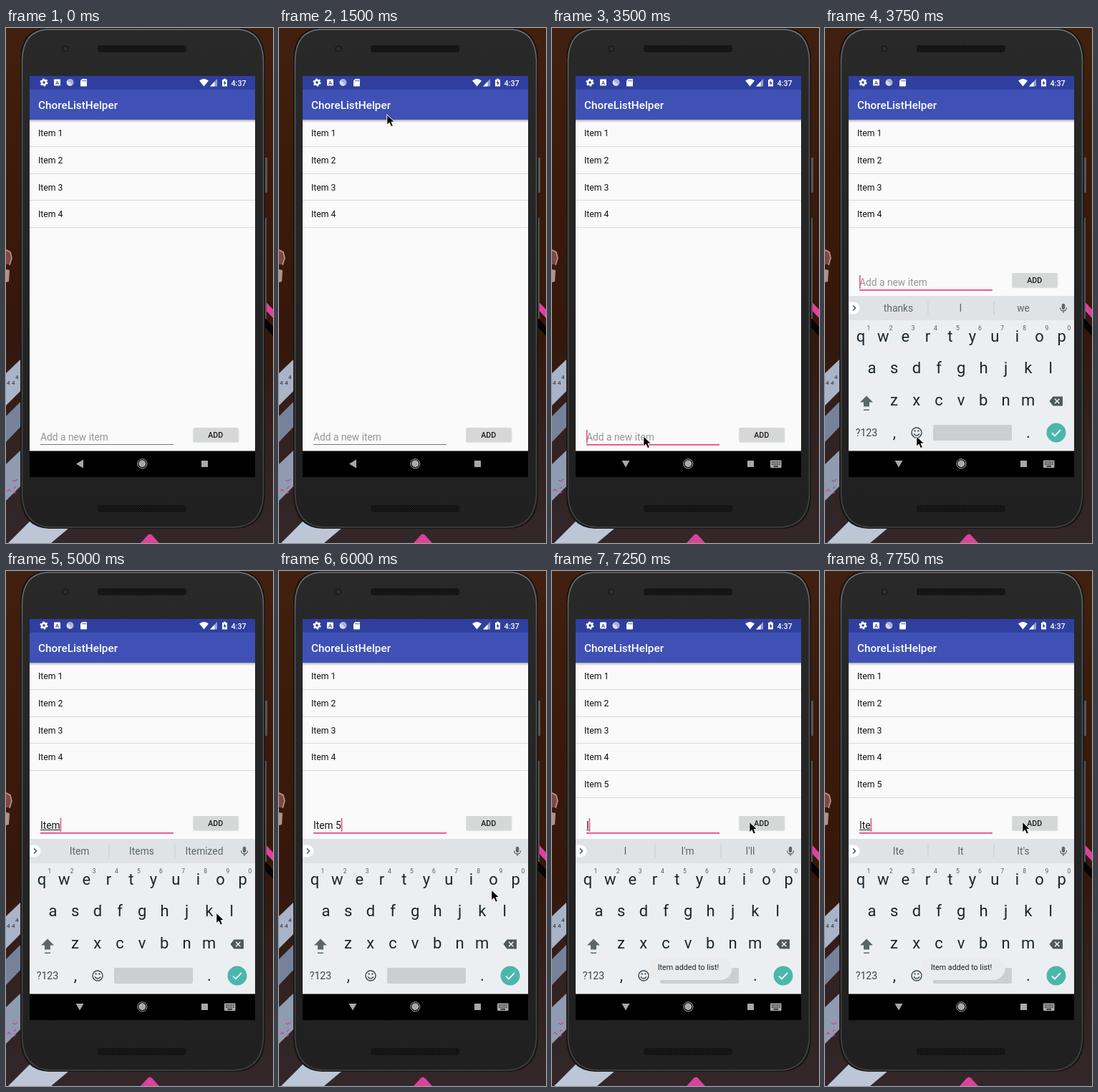
These frames come from a looping animation (373x719 px, 8 s). An HTML page:

```html
<!DOCTYPE html>
<html lang="en">
<head>
<meta charset="utf-8">
<title>List app</title>
<style>
  html, body { margin: 0; width: 100%; height: 100%; overflow: hidden; background: #381a0d; }
  svg { display: block; width: 100vw; height: 100vh; }
  text { font-family: Roboto, sans-serif; white-space: pre; }
  .mid { text-anchor: middle; }
  .bold { font-weight: 500; }
</style>
</head>
<body>
<svg id="stage" viewBox="0 0 373 719" xmlns="http://www.w3.org/2000/svg">
  <defs>
    <linearGradient id="wall" x2="0" y2="1">
      <stop offset="0" stop-color="#42200f"/>
      <stop offset=".3" stop-color="#3c1a0a"/>
      <stop offset=".6" stop-color="#35170b"/>
      <stop offset=".8" stop-color="#322220"/>
      <stop offset="1" stop-color="#33272a"/>
    </linearGradient>
    <linearGradient id="body" x2="0" y2="1">
      <stop offset="0" stop-color="#292929"/>
      <stop offset="1" stop-color="#202020"/>
    </linearGradient>
    <linearGradient id="rim" x2="0" y2="1">
      <stop offset="0" stop-color="#777"/>
      <stop offset=".12" stop-color="#585858"/>
      <stop offset="1" stop-color="#444"/>
    </linearGradient>
    <linearGradient id="drop" x2="0" y2="1">
      <stop offset="0" stop-color="#000" stop-opacity=".3"/>
      <stop offset="1" stop-color="#000" stop-opacity="0"/>
    </linearGradient>
    <pattern id="mesh" width="3" height="3" patternUnits="userSpaceOnUse">
      <path fill="#101010" d="M0 0h3v3H0z"/>
      <path fill="#262626" d="M0 0h1v1H0zM1.5 1.5h1v1h-1z"/>
    </pattern>
    <clipPath id="screen"><path d="M33 67H348V627H33z"/></clipPath>
  </defs>

  <!-- wallpaper -->
  <path fill="url(#wall)" d="M0 0H373V719H0z"/>
  <path fill="#7d4a42" d="M0 309l5 2 3 8-3 11H0z"/>
  <path fill="none" stroke="#c39c96" stroke-width="1.500" d="M0 310l6 3 2 8-3 10"/>
  <path fill="#b58f88" d="M0 337l5 1-1 16-4 1z"/>
  <g fill="#a9b4c8">
    <path d="M22 461V505L0 527V482z"/>
    <path fill="#75829a" d="M22 520V555L0 578V542z"/>
    <path fill="#8f9bb0" d="M22 588V638L0 660V609z"/>
    <path fill="#bcc6d6" d="M40 682L88 698 63 719H3z"/>
  </g>
  <g font-size="8" fill="#26242d">
    <text x="13" y="490">4</text><text x="1" y="498">4</text><text x="8" y="498">4</text>
  </g>
  <path fill="none" stroke="#c8458f" stroke-width="1.200" d="M9 631l3 2 4-3M2 647l2-3 3 3M11 643l3-3M10 650l4-2"/>
  <path fill="#e0409f" d="M361 380l12 13v12l-12-13z"/>
  <path fill="#050505" d="M361 404l12 13v13l-12-13z"/>
  <path fill="#d9439a" d="M188 719l10-11q3-3 6 0l10 11z"/>

  <!-- phone -->
  <path fill="#54565a" d="M361 181h4v49h-4zM361 265h3v141h-3z"/>
  <path fill="#161616" d="M54 0H328Q360 3 362 42V655Q360 697 322 699H60Q22 697 20 655V42Q21 3 54 0z"/>
  <path fill="url(#body)" stroke="url(#rim)" stroke-width="1.500" d="M56 2H326Q358 5 359.500 44V653Q357 695 320 697H62Q25 695 22.500 653V44Q24 5 56 2z"/>
  <circle cx="83" cy="29" r="5" fill="#1e1e1e"/><circle cx="83" cy="29" r="2.500" fill="#303030"/>
  <rect x="128" y="24" width="124" height="10" rx="4" fill="url(#mesh)"/>
  <rect x="128" y="666" width="124" height="10" rx="4" fill="url(#mesh)"/>

  <g clip-path="url(#screen)">
    <path fill="#fafafa" d="M33 67H348V627H33z"/>
    <path fill="url(#drop)" d="M33 128H348v4H33z"/>
    <path fill="#303f9f" d="M33 67H348V86H33z"/>
    <path fill="#3f51b5" d="M33 86H348V128H33z"/>
    <text class="bold" x="45" y="113" font-size="15.300" fill="#fff">ChoreListHelper</text>

    <!-- status icons -->
    <g fill="#fff">
      <circle cx="53" cy="76" r="3.100" fill="none" stroke="#fff" stroke-width="2.600"/>
      <circle cx="53" cy="76" r="4.800" fill="none" stroke="#fff" stroke-width="1.600" stroke-dasharray="2.500 2.527"/>
      <rect x="67" y="71.500" width="9" height="9" rx="1"/>
      <text class="mid bold" x="71.500" y="78.800" font-size="7.500" fill="#303f9f">A</text>
      <circle cx="89.500" cy="76" r="5" fill="#aab1d8"/>
      <path d="M86 73a4.500 4.500 0 0 0 6.500 6.300z" opacity=".55"/>
      <path d="M106.500 71H112a1 1 0 0 1 1 1v8.500a1 1 0 0 1-1 1h-7a1 1 0 0 1-1-1V73.500z"/>
      <path stroke="#303f9f" d="M107.500 72.500v2M109.500 72.500v2M111.500 72.500v2"/>
      <path d="M270 73.500Q276.500 68.500 283 73.500L276.500 81.500z"/>
      <path opacity=".5" d="M295 71V81.500H285z"/><path d="M291.500 74.700V81.500H285z"/>
      <path d="M302 72h2v-1.200h3V72h2v9.500h-7z"/>
      <path fill="#303f9f" d="M306 73.200l-2.500 4h1.700v3l2.500-4.200H306z"/>
      <text class="bold" x="314.500" y="80.500" font-size="10.730">4:37</text>
    </g>

    <g id="list" font-size="12.260" fill="#111"></g>

    <g id="entry">
      <text id="hint" x="48" y="576" font-size="13.800" fill="#959595">Add a new item</text>
      <text id="typed" x="48" y="576" font-size="13.800" fill="#151515"></text>
      <path id="compose" stroke="#222" fill="none"/>
      <path id="line"/>
      <path id="caret" fill="#f04482" d="M0 561h1.500v19H0z"/>
      <rect id="shade" x="261" y="558" width="64.500" height="22" rx="2"/>
      <rect x="262" y="558" width="62" height="19.500" rx="1.500" fill="#d6d7d7"/>
      <text class="mid bold" x="292.700" y="572.300" font-size="10.730" fill="#1b1b1b">ADD</text>
    </g>

    <g id="keyboard">
      <path fill="#eceff1" d="M33 374H348V591H33z"/>
      <path fill="#dfe3e6" d="M33 374H348V408H33z"/>
      <path fill="#fff" d="M33 382.500h7a8.500 8.500 0 0 1 0 17h-7z"/>
      <path fill="none" stroke="#444f54" stroke-width="1.500" d="M39 387.500l3.500 3.500-3.500 3.500"/>
      <g id="words" font-size="13.800" fill="#5b676c"></g>
      <g fill="none" stroke="#5b676c" stroke-width="1.300">
        <rect x="331.400" y="385.300" width="3.200" height="7" rx="1.600" fill="#5b676c"/>
        <path d="M328.500 390.500a4.500 4.500 0 0 0 9 0M333 395v3"/>
      </g>
      <g id="keys" font-size="22" fill="#17272e"></g>
      <path fill="#59676d" d="M58 513.500l9 9h-5v6h-8v-6h-5zM54 532.500h8v1.500h-8z"/>
      <path fill="#4c5a60" d="M313.500 521l5-6.500H332v13h-13.500z"/>
      <path stroke="#eceff1" stroke-width="1.600" d="M321 517.800l6.400 6.400M327.400 517.800l-6.400 6.400"/>
      <text class="mid" x="58" y="569.800" font-size="14.200" fill="#37474f">?123</text>
      <g fill="none" stroke="#37474f" stroke-width="1.400">
        <circle cx="128" cy="565" r="7"/><path d="M124 566.500q4 5 8 0"/>
        <path stroke-width="2" d="M124.600 562.500h2M129.400 562.500h2"/>
      </g>
      <rect x="151" y="554" width="110" height="22" rx="2" fill="#c9cfd2"/>
      <circle cx="323" cy="565" r="13.500" fill="#4db6ac"/>
      <path fill="none" stroke="#fff" stroke-width="1.800" d="M317 565.500l4 4 8-8.500"/>
      <g id="toast">
        <rect x="135" y="539" width="116.500" height="32" rx="16" fill="#e9ebec"/>
        <text class="mid" x="190.500" y="557" font-size="10.730" fill="#222">Item added to list!</text>
      </g>
    </g>

    <path d="M33 590.500H348V627H33z"/>
    <g fill="#a8a8a8">
      <path id="back"/>
      <circle cx="190.300" cy="608.300" r="5"/>
      <circle cx="190.300" cy="608.300" r="6.600" fill="none" stroke="#a8a8a8"/>
      <path d="M273 604h9v9h-9z"/>
      <g id="switcher">
        <rect x="305" y="603.500" width="15.500" height="10.500" rx="1"/>
        <path stroke="#000" stroke-width="1.300" stroke-dasharray="1.500 1" d="M307 606.200h12M307 608.800h12"/>
        <path stroke="#000" stroke-width="1.300" d="M309.500 611.800h6.500"/>
      </g>
    </g>
  </g>

  <path id="pointer" stroke="#fff" stroke-width="1" stroke-linejoin="round"
    d="M.8 .3V14.800L4.200 11.700 6.600 17.200 9.400 16 7 10.600H11.500z"/>
</svg>

<script>
const LOOP = 8000, STEP = 250;
const $ = id => document.getElementById(id);

function add(parent, tag, attrs, text = "") {
  const el = document.createElementNS("http://www.w3.org/2000/svg", tag);
  for (const k in attrs) el.setAttribute(k, attrs[k]);
  el.textContent = text;
  return parent.appendChild(el);
}
const show = (id, on) => $(id).setAttribute("visibility", on ? "inherit" : "hidden");

// list rows
const rows = [1, 2, 3, 4, 5].map((n, i) => {
  const g = add($("list"), "g", {}), y = 128 + 37.6 * i;
  add(g, "text", { x: 45, y: y + 23.3 }, "Item " + n);
  add(g, "path", { d: `M33 ${Math.floor(y + 37.6) + .5}H348`, stroke: "#dadada" });
  return g;
});

// letter keys
function keyRow(letters, x, y) {
  [...letters].forEach((c, i) => add($("keys"), "text", { class: "mid", x: x + 31.2 * i, y }, c));
}
keyRow("qwertyuiop", 50, 437.5);
keyRow("asdfghjkl", 65.5, 482.3);
keyRow("zxcvbnm", 96.5, 527.3);
keyRow(",", 97, 572);
keyRow(".", 284, 572);
[..."1234567890"].forEach((c, i) =>
  add($("keys"), "text", { class: "mid", x: 61 + 31.1 * i, y: 421.5, "font-size": 8.5, fill: "#4b5b62" }, c));

// word suggestions
const words = [102.5, 189.5, 277].map(x => add($("words"), "text", { class: "mid", x, y: 396 }));
const bars = [144, 236].map(x => add($("words"), "path", { d: `M${x} 382v18`, stroke: "#c6ccd0" }));

// [start, typed text, suggestions]
const typing = [
  [0, "", "thanks|I|we"],
  [4500, "I", "I|I'm|I'll"],
  [4750, "Ite", "Ite|It|It's"],
  [5000, "Item", "Item|Items|Itemized"],
  [5250, "Item ", ""],
  [5750, "Item 5", ""],
  [7000, "", "thanks|I|we"],
  [7250, "I", "I|I'm|I'll"],
  [7500, "It", "It|It's|Its"],
  [7750, "Ite", "Ite|It|It's"]
];

// [start, x, y]
const moves = [
  [0, 0, -40], [750, 319, 1], [1000, 245, 50], [1250, 142, 108], [1500, 150, 120.5],
  [1750, 241, 487], [2000, 205, 530], [2250, 170, 562], [2500, 157, 568],
  [3250, 127, 569.5], [4000, 215, 522], [4250, 293, 477],
  [6000, 296, 445], [6250, 286, 390], [6500, 275, 350]
];
const at = (list, t) => list.findLast(e => e[0] <= t);

function draw(t) {
  const focus = t >= 3500, open = t >= 3750, pressed = t >= 6750 && t < 7000;
  const [, text, hints] = at(typing, t);
  const [, px, py] = at(moves, t);

  rows[4].setAttribute("visibility", t >= 7000 ? "visible" : "hidden");
  $("entry").setAttribute("transform", `translate(0 ${open ? -216 : 0})`);
  show("hint", !text);
  $("typed").textContent = text;
  const width = text ? $("typed").getComputedTextLength() : 0;
  const composing = text && !text.includes(" ");
  $("compose").setAttribute("d", composing ? `M48 577.5h${width}` : "");
  show("caret", focus);
  $("caret").setAttribute("transform", `translate(${48 + width} 0)`);
  $("line").setAttribute("d", focus ? "M48 581h186v1.700H48z" : "M48 581h186v1H48z");
  $("line").setAttribute("fill", focus ? "#f04482" : "#777");
  $("shade").setAttribute("fill", pressed ? "#b3b3b3" : "#dedede");
  $("shade").setAttribute("height", pressed ? 22.5 : 21);

  show("keyboard", open);
  const list = hints.split("|");
  words.forEach((w, i) => w.textContent = list[i] || "");
  bars.forEach(b => b.setAttribute("visibility", hints ? "inherit" : "hidden"));
  $("toast").setAttribute("visibility", t >= 7250 ? "inherit" : "hidden");

  $("back").setAttribute("d", focus ? "M97.500 604h11l-5.500 9.500z" : "M98 608.500l10-6v12z");
  show("switcher", focus);
  $("pointer").setAttribute("transform", `translate(${px} ${py})`);
}

function tick() {
  draw(Math.floor(performance.now() % LOOP / STEP) * STEP);
  requestAnimationFrame(tick);
}
tick();
</script>
</body>
</html>
```
